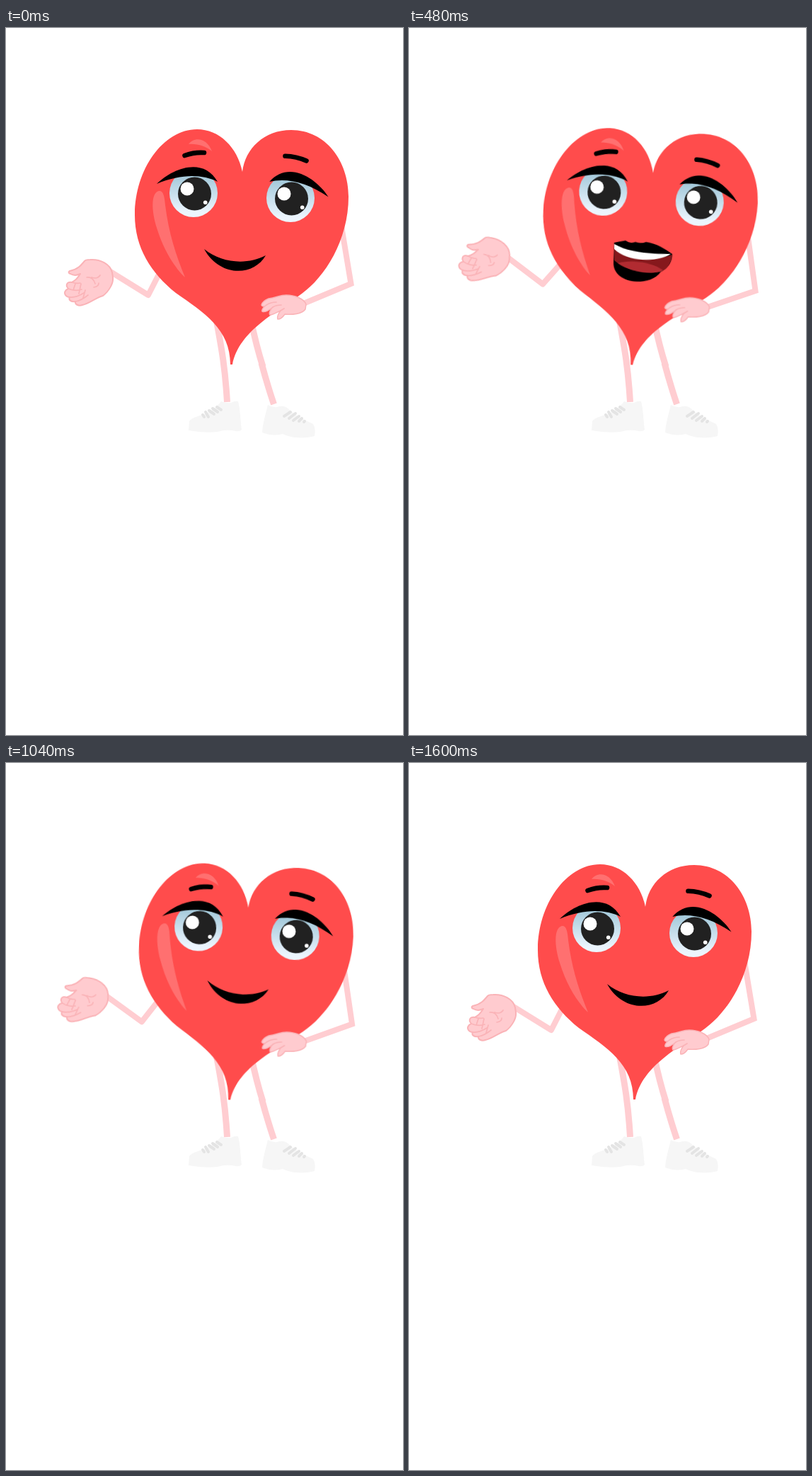
Animation, 561 px wide and 998 px high, one loop 1.64 s. Source, as an HTML page without scripts:

```html
<!DOCTYPE html>
<html lang="en">
<head>
<meta charset="utf-8">
<title>Talking heart</title>
<style>
  html, body { margin: 0; width: 100%; height: 100%; overflow: hidden; background: #fff; }
  svg { display: block; width: 100vw; height: 100vh; }

  /* everything shares one 1640 ms loop */
  .sway, .arm-l, .arm-r, .hand-l, .hand-r { animation: 1640ms ease-in-out infinite; }
  .sway { animation-name: sway; transform-origin: 308px 405px; }
  .arm-l { animation-name: armL; }
  .arm-r { animation-name: armR; }
  .hand-l { animation-name: handL; transform-origin: 117px 359px; }
  .hand-r { animation-name: handR; }

  @keyframes sway {
    0%, 12.19%, 73.17%, 100% { transform: rotate(0deg); }
    29.27%, 58.53% { transform: rotate(3.1deg); }
  }
  @keyframes armL {
    0%, 12.19%, 73.17%, 100% { d: path("M224 332 L201 377 L146 343"); }
    29.27%, 58.53% { d: path("M224 322 L189 361.5 L137 322"); }
  }
  @keyframes armR {
    0%, 12.19%, 73.17%, 100% { d: path("M474 280 L487.5 361 L418 390"); }
    29.27%, 58.53% { d: path("M478 288 L489.5 371 L419 395"); }
  }
  @keyframes handL {
    0%, 12.19%, 73.17%, 100% { transform: translate(0, 0) rotate(0deg); }
    29.27%, 58.53% { transform: translate(-10px, -32px) rotate(12deg); }
  }
  @keyframes handR {
    0%, 12.19%, 73.17%, 100% { transform: translate(0, 0); }
    29.27%, 58.53% { transform: translate(.5px, 3.7px); }
  }

  /* blink */
  .open, .half, .shut, .mouth > * { animation: 1640ms step-end infinite; }
  .open { animation-name: open; }
  .half { animation-name: half; }
  .shut { animation-name: shut; }
  @keyframes open {
    0%, 12.19%, 82.92% { visibility: visible; }
    4.87%, 75.6% { visibility: hidden; }
  }
  @keyframes half {
    0%, 7.31%, 12.19%, 78.04%, 82.92% { visibility: hidden; }
    4.87%, 9.75%, 75.6%, 80.48% { visibility: visible; }
  }
  @keyframes shut {
    0%, 9.75%, 80.48% { visibility: hidden; }
    7.31%, 78.04% { visibility: visible; }
  }

  /* mouth shapes */
  .mouth .smile { animation-name: smile; }
  .mouth .smile-up { animation-name: smileUp; }
  .mouth .round { animation-name: round; }
  .mouth .wide { animation-name: wide; }
  @keyframes smile {
    0%, 97.56% { visibility: visible; }
    14.63% { visibility: hidden; }
  }
  @keyframes smileUp {
    0%, 97.56% { visibility: hidden; }
    53.65% { visibility: visible; }
  }
  @keyframes round {
    0%, 24.39%, 39.02%, 48.78% { visibility: hidden; }
    14.63%, 31.7%, 43.9% { visibility: visible; }
  }
  @keyframes wide {
    0%, 31.7%, 43.9%, 53.65% { visibility: hidden; }
    24.39%, 39.02%, 48.78% { visibility: visible; }
  }

  .limb { fill: none; stroke: #ffcdd1; stroke-width: 9; }
  .hand { fill: #ffcbcf; stroke: #fab3b7; stroke-width: 2; stroke-linejoin: round; }
  .crease { fill: none; stroke: #fab3b7; stroke-width: 1.7; stroke-linecap: round; }
  .shoe { fill: #f6f6f6; }
  .lace { fill: none; stroke: #e4e4e4; stroke-width: 4; stroke-linecap: round; }
  .shine { fill: #ff7070; }
  .brow { fill: none; stroke: #000; stroke-width: 6.6; stroke-linecap: round; }
  .dark { fill: #86181c; }
  .flip { transform: rotate(12.5deg) scaleX(-1); }
</style>
</head>
<body>
<svg viewBox="0 0 561 998" preserveAspectRatio="none">
  <defs>
    <linearGradient id="iris" x1="0" y1="0" x2="0" y2="1">
      <stop offset=".15" stop-color="#a5cadb"/>
      <stop offset=".9" stop-color="#ecf5fe"/>
    </linearGradient>
    <clipPath id="openClip"><path d="M-52 -13 C-18 -30 12 -30 34 -18 L40 60 H-52Z"/></clipPath>
    <clipPath id="halfClip"><path d="M-53 12 C-15 -3 20 -3 35 12 V60 H-53Z"/></clipPath>
    <clipPath id="lidClip"><path d="M-53 12 C-15 -3 20 -3 37 13 V-60 H-53Z"/></clipPath>
    <g id="ball">
      <circle r="34" fill="url(#iris)"/>
      <circle cx="1.5" cy="1" r="23.5" fill="#212121"/>
      <circle cx="-9" cy="-6" r="9.5" fill="#fff"/>
      <circle cx="16.7" cy="13.3" r="2.8" fill="#fff"/>
    </g>
    <path id="lashOpen" d="M-52 -13 C-30 -35 14 -52 34 -16 C12 -27 -18 -27 -52 -13Z"/>
    <path id="lashHalf" d="M-53 14 C-30 -8 15 -18 36 13 L34 16 C20 2 -15 0 -53 14Z"/>
    <path id="lashShut" d="M-53 24 C-28 34 18 32 35 22 C20 42 -25 44 -53 24Z"/>
    <path id="grin" d="M280 312 C305 332 340 335 367 321 C350 351 302 352 280 312Z"/>
    <circle id="lid" class="dark" cy="2" r="38"/>
  </defs>

  <!-- legs and shoes -->
  <path class="limb" d="M295 400 C303 445 309 470 312.5 528"/>
  <path class="limb" d="M346 412 Q354 450 363 478 M361 473 Q369 503 378.5 531"/>
  <path class="shoe" d="M258 568 L259 555 C264 549 272 548 280 545 C290 541 298 535 304 527 Q311 530 318 529 Q323 526 328 527 C331 538 331 552 333 567 Q330 570 325 569 Q311 566 299 570 Q280 572 258 568Z"/>
  <path class="lace" d="M278 546 l2 3 M282 542 l4 7 M287 540 l7 5 M292 537 l7 5 M298 535 l6 4"/>
  <path class="shoe" d="M362 571 C363 557 367 545 370 532 Q376 536 383 535 Q391 532 397 536 C407 545 418 552 434 559 Q438 566 436 576 C422 580 402 579 391 573 Q377 577 362 571Z"/>
  <path class="lace" d="M393 548 l9 -6 M400 551 l9 -7 M406 554 l8 -6 M414 555 l4 -4 M421 556 l1 -1"/>

  <!-- arms behind the body -->
  <path class="limb arm-l" style="stroke-width:8" stroke-linejoin="round" d="M224 332 L201 377 L146 343"/>
  <path class="limb arm-r" style="stroke-width:8" d="M474 280 L487.5 361 L418 390"/>
  <g class="hand-l">
    <path class="hand" d="M150 345 C147 333 133 326 119 327 C115 327 112 327 111 329 C106 335 101 341 90 343 C88 344 88 346 91 347 C96 350 101 349 105 347 C102 352 97 357 93 359 C87 358 85 361 86 365 L88 368 C83 370 82 374 84 377 Q86 380 90 380 C88 384 92 387 98 386 C97 390 102 393 108 391 C118 389 128 380 137 378 C146 371 152 360 151 352Z"/>
    <path class="crease" d="M93 359 Q99 361 105 360 M88 368 Q98 372 107 369 M90 380 Q99 381 110 374 M98 386 Q106 385 116 377 M98 361 l-3 9 M106 361 l-3 14 M112 370 l-3 11 M114 352 Q123 351 126 361 M121 352 Q129 355 133 349 M124 366 Q131 365 131 360"/>
  </g>

  <!-- body and face -->
  <g class="sway">
    <path fill="#ff4c4c" d="M334 203 C338 170 365 144 403 144 C452 144 484 188 484 238 C484 300 450 352 418 375 C385 400 329 427 320 475 H317 C317 425 280 402 240 374 C205 346 182 310 182 264 C182 200 222 143 270 143 C301 143 327 168 334 203Z"/>
    <path class="shine" d="M216 230 C204 233 206 260 213 282 C223 315 240 340 253 352 C240 320 230 290 225 250 C224 237 222 229 216 230Z"/>
    <path class="shine" d="M258 164 C266 153 284 155 291 174 C283 167 270 163 258 164Z"/>
    <path class="brow" d="M252.5 180 Q266 175 280 176"/>
    <path class="brow" d="M394.5 180.7 Q410 181 424.5 187.5"/>

    <g transform="translate(265 233)">
      <g class="open"><g clip-path="url(#openClip)"><use href="#ball"/></g><use href="#lashOpen"/></g>
      <g class="half"><g clip-path="url(#lidClip)"><use href="#lid" x="-1"/></g><g clip-path="url(#halfClip)"><use href="#ball"/></g><use href="#lashHalf"/></g>
      <g class="shut"><use href="#lid" x="-1"/><use href="#lashShut"/></g>
    </g>
    <!-- the flip is its own inverse, so the ball stays upright -->
    <g transform="translate(402 240)"><g class="flip">
      <g class="open"><g clip-path="url(#openClip)"><use class="flip" href="#ball"/></g><use href="#lashOpen"/></g>
      <g class="half"><g clip-path="url(#lidClip)"><use href="#lid" x="1" y="-1"/></g><g clip-path="url(#halfClip)"><use class="flip" href="#ball"/></g><use href="#lashHalf"/></g>
      <g class="shut"><use href="#lid" x="1" y="-1"/><use href="#lashShut"/></g>
    </g></g>

    <g class="mouth">
      <use class="smile" href="#grin"/>
      <use class="smile-up" href="#grin" x=".5" y="-4"/>
      <g class="round">
        <circle cx="318.6" cy="328" r="14.7" fill="#2b2b2b"/>
        <path class="dark" d="M304.5 332 A14.7 14.7 0 1 1 332.7 332 Q319 345 304.5 332Z"/>
      </g>
      <g class="wide" transform="rotate(-3.1 308 405)">
        <path d="M290 303 L306 300 Q313 305 320 302 Q328 305 335 302 C350 304 362 312 372 319 C372 334 362 341 356 344 C348 355 335 358 322 358 C303 357 288 347 289 330Z"/>
        <path class="dark" d="M290 310 C315 329 350 328 371.5 320 C371 334 363 341 355 344 C338 348 308 344 290 328Z"/>
        <path fill="#b12b31" d="M295 332 C310 327 342 329 359 342 L355 344 C338 348 312 344 295 332Z"/>
        <path fill="#fff" d="M290 305 C312 318 345 319 370 319 C352 331 308 331 290 312Z"/>
      </g>
    </g>
  </g>

  <!-- hand on the hip -->
  <g class="hand-r">
    <path class="hand" style="stroke-width:1.5" d="M424 390 C421 382 408 377 396 377 C386 377 382 381 371 382 C366 384 362 387 361 391 C362 394 366 393 368 391 C364 394 361 397 362 400 C366 402 371 399 377 394 C374 397 371 402 373 405 C378 405 383 401 388 399 C385 403 383 408 384 411 C389 411 392 407 394 404 C404 405 418 404 423 397Z"/>
    <path class="crease" d="M368 391 Q374 387 382 387 M377 394 Q382 391 389 391 M388 399 L393 396"/>
  </g>
</svg>
</body>
</html>
```
